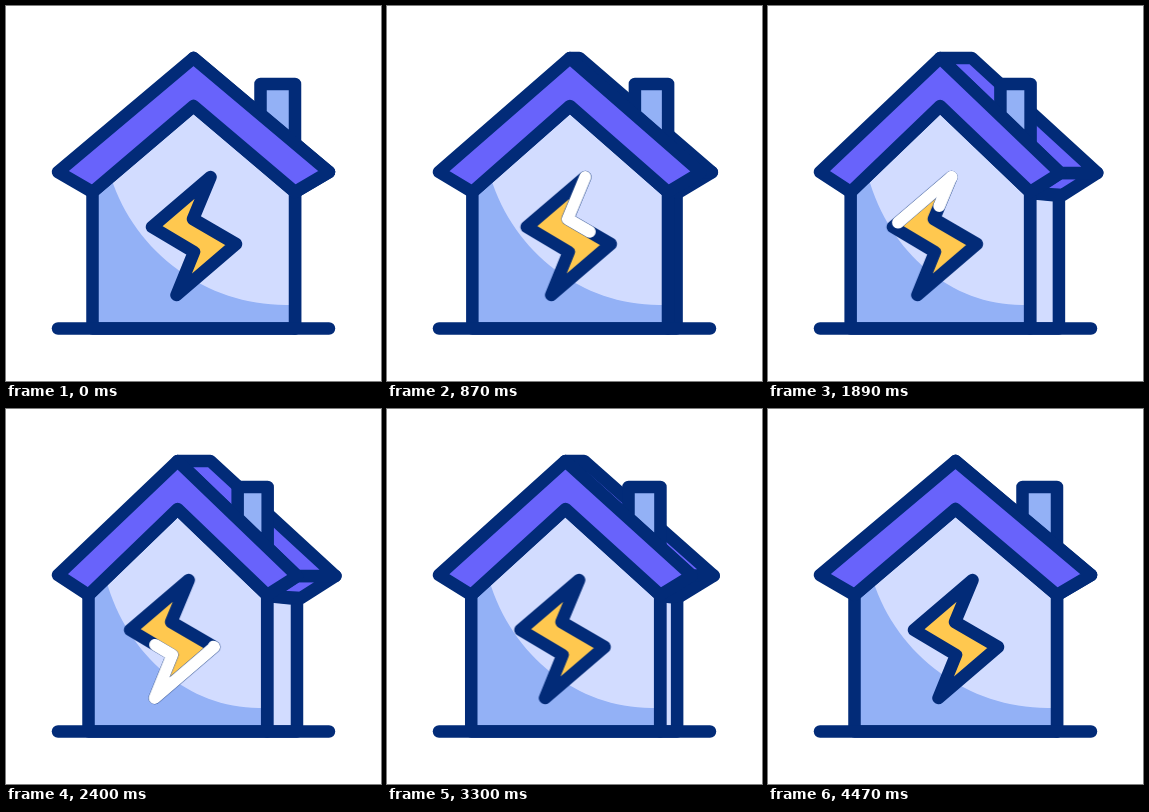
Animation of 375 by 375 pixels, one loop 5.4 s. Source, as an HTML page without scripts:

```html
<!DOCTYPE html>
<html lang="en">
<head>
<meta charset="utf-8">
<title>Home energy icon</title>
<style>
  @property --start { syntax: "<length>"; inherits: false; initial-value: 0px; }
  @property --end { syntax: "<length>"; inherits: false; initial-value: 0px; }

  html, body { margin: 0; width: 100%; height: 100%; overflow: hidden; background: #fff; }
  svg { display: block; width: 100%; height: 100%; }

  path { stroke: #022b78; stroke-width: 12.5; stroke-linecap: round; stroke-linejoin: round; }
  .roof { fill: #6863fb; }
  .wall { fill: #d2dcff; }
  .blue { fill: #93b1f6; }
  .open { fill: none; }
  .flat { stroke: none; }

  /* The house turns to show its side and turns back, then rests */
  .turn { animation: 5.4s cubic-bezier(.5, 0, .5, 1) infinite; }
  #slope { animation-name: slope; }
  #eave { animation-name: eave; }
  #side { animation-name: side; }
  #chimney { animation-name: chimney; }
  #front, #edge { animation-name: front; }
  #shade { animation-name: shade; }
  #gable { animation-name: gable; }
  #bolt { animation-name: bolt; }

  @keyframes slope {
    0%, 83.33%, 100% { d: path("M187.5 52L187.5 52L323 166L323 166Z"); }
    41.67% { d: path("M171.5 52L204.5 52L329.5 167L291 167Z"); }
  }
  @keyframes eave {
    0%, 83.33%, 100% { d: path("M323 166L323 166L289 186L289 186Z"); }
    41.67% { d: path("M291 167L329.5 167L295 189L261 187Z"); }
  }
  @keyframes side {
    0%, 83.33%, 100% { d: path("M289 187L289 187L289 322.5L289 322.5Z"); }
    41.67% { d: path("M261 187L291 190L291 322.5L261 322.5Z"); }
  }
  @keyframes chimney {
    0%, 83.33%, 100% { d: path("M254.5 108L254.5 78L289 78L289 137Z"); }
    41.67% { d: path("M231.5 109L231.5 78L261.5 78L261.5 138Z"); }
  }
  @keyframes front {
    0%, 83.33%, 100% { d: path("M86.5 322.5L86.5 186L187.5 100L289 186L289 322.5Z"); }
    41.67% { d: path("M82.5 322.5L82.5 186L171.5 100L261 186L261 322.5Z"); }
  }
  @keyframes shade {
    0%, 83.33%, 100% { d: path("M86.5 322.5L86.5 186L104.8 171C130.2 250.4 206.4 303 289 298.7L289 322.5Z"); }
    41.67% { d: path("M82.5 322.5L82.5 186L100 171C122.5 250.4 188 303 261 298.7L261 322.5Z"); }
  }
  @keyframes gable {
    0%, 83.33%, 100% { d: path("M187.5 52L323 166L289 186L187.5 100L86.5 186L52 166Z"); }
    41.67% { d: path("M171.5 52L291 167L261 186L171.5 100L82.5 186L52 166Z"); }
  }
  @keyframes bolt {
    0%, 83.33%, 100% { transform: none; }
    41.67% { transform: translateX(-22px); }
  }

  /* Two white strokes chase around the bolt */
  .trace {
    fill: none;
    stroke: #fff;
    stroke-width: 12;
    stroke-dasharray: calc(var(--end) - var(--start)) 999px;
    stroke-dashoffset: calc(-1 * var(--start));
    animation: 5.4s cubic-bezier(.33, 0, .67, 1) infinite;
    animation-timing-function: cubic-bezier(.33, 0, .67, 1), cubic-bezier(.33, 0, .67, 1), step-end;
  }
  .one { animation-name: head1, tail1, show1; }
  .two { animation-name: head2, tail2, show2; }

  @keyframes head1 { 0%, 10% { --end: 0px; } 31.11%, 100% { --end: 100px; } }
  @keyframes tail1 { 0%, 20% { --start: 0px; } 41.11%, 100% { --start: 100px; } }
  @keyframes show1 { 0% { opacity: 0; } 10% { opacity: 1; } 41.11%, 100% { opacity: 0; } }
  @keyframes head2 { 0%, 31.11% { --end: 0px; } 52.22%, 100% { --end: 100px; } }
  @keyframes tail2 { 0%, 37.22% { --start: 0px; } 58.33%, 100% { --start: 100px; } }
  @keyframes show2 { 0% { opacity: 0; } 31.11% { opacity: 1; } 58.33%, 100% { opacity: 0; } }
</style>
</head>
<body>
<svg viewBox="0 0 375 375">
  <path id="side" class="turn wall"/>
  <path id="eave" class="turn roof"/>
  <path id="slope" class="turn roof"/>
  <path id="chimney" class="turn blue"/>
  <path id="front" class="turn wall flat"/>
  <path id="shade" class="turn blue flat"/>
  <path id="edge" class="turn open"/>
  <path id="gable" class="turn roof"/>
  <path class="open" d="M52 322.5H323"/>
  <g id="bolt" class="turn">
    <path fill="#ffc84f" d="M204.5 171L187 213L230 238L170.5 289L188 246L146 221Z"/>
    <path class="trace one" pathLength="100" d="M204.5 171L187 213L230 238L170.5 289L188 246L146 221L204.5 171"/>
    <path class="trace two" pathLength="100" d="M204.5 171L187 213L230 238L170.5 289L188 246L146 221L204.5 171"/>
  </g>
</svg>
</body>
</html>
```
